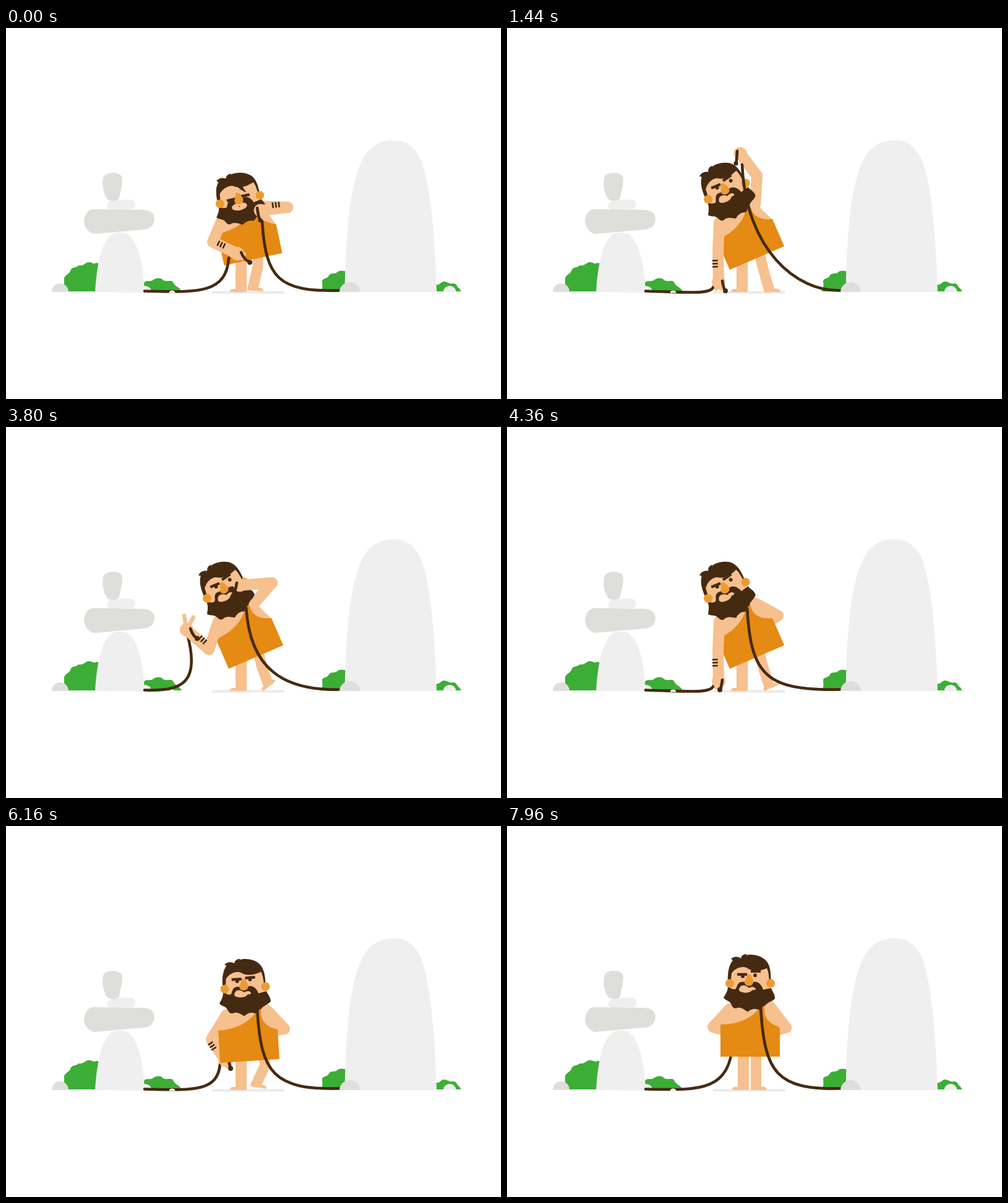
An HTML page that plays this animation: 800 px wide and 600 px high, repeating every 8 s.

```html
<!DOCTYPE html>
<html lang="en">
<head>
<meta charset="utf-8">
<title>Rope</title>
<style>
html, body { margin: 0; width: 100%; height: 100%; overflow: hidden; background: #fff; }
svg { display: block; width: 100%; height: 100%; }
</style>
</head>
<body>
<svg viewBox="0 0 800 600">
  <g fill="#3cae36">
    <path d="M94 426V404C98 397 101 399 104 393C106 385 113 389 117 384C122 385 125 383 128 381C135 376 139 381 143 381Q147 379 150 381V426Z"/>
    <path d="M223 412C226 407 232 411 237 408C242 404 250 403 254 408C261 411 267 407 270 411C273 419 280 418 284 426H223Z"/>
    <path d="M508 426C513 421 511 416 511 408C515 404 518 405 521 402C523 395 530 398 534 396C540 390 545 394 550 393V426Z"/>
    <path d="M695 415C700 417 703 410 708 410C713 410 717 415 723 413C730 414 728 418 731 420C735 422 733 425 737 426H695Z"/>
  </g>
  <g fill="#efefef">
    <path d="M144 427C146 390 153 345 172 333C180 330 190 330 197 334C213 345 222 380 224 428Z"/>
    <path d="M170 280C180 277 196 277 203 278C211 280 211 290 204 293L168 294C161 291 162 282 170 280Z"/>
    <path d="M223 417C230 417 235 421 235 426H223Z"/>
    <path d="M547.500 427C549 330 556 240 582 203C594 187 612 181.500 627 181.500C645 181.500 658 190 668 208C688 250 693 350 696 427Z"/>
    <path d="M706.500 427a10.500 10 0 0 1 21 0Z"/>
    <rect x="333" y="425.500" width="117" height="4" rx="2" fill="#ebebeb"/>
  </g>
  <g fill="#dededb">
    <path d="M158 240C165 232 182 233 187 240C190 249 185 262 183 275C180 281 167 281 163 276C157 266 154 252 158 240Z"/>
    <path d="M140 293L222 294C232 295 240 299 240 309C239 320 233 325 222 326L143 333C133 332 126 321 126 313C127 302 132 294 140 293Z"/>
    <path d="M74 427a13.500 14 0 0 1 27 0Z"/>
  </g>
  <g id="man"></g>
  <path d="M263.500 428.500a5 4 0 0 1 10 0Z" fill="#f6f6f6"/>
  <path d="M539 427a16.500 16 0 0 1 33 0Z" fill="#dededb"/>
</svg>
<script>
const SKIN = '#f6c08f', CLOTH = '#e58a13', HAIR = '#452a12', BLUSH = '#ec9b33';
const TAU = Math.PI * 2, LOOP = 8000, GROUND = 427;
const man = document.getElementById('man');

// leg: x of hip, knee and heel, then y of heel.
// ropeL, tailL, tailR: sideways offsets; slack and taut shape the ropes.
const START = {
  hip: [399.5, 374], lean: -12, bow: 1, squint: 0, leg: [407, 407, 390, 424],
  elbowL: [334, 346], handL: [374, 365], ropeL: -14, tailL: 14, slack: 0, peace: 0,
  elbowR: [455, 290], handR: [411, 295], tailR: 5, taut: 0, bite: 0
};
const LOW = { elbowL: [341, 362], handL: [342, 411], ropeL: -8, tailL: 5, slack: 0, peace: 0 };

// Each step moves only the named parts to a new place.
const STEPS = [
  { from: 120, to: 760, hip: [404, 372], lean: -23.4, bow: 0, leg: [408, 413, 416, GROUND] },
  { from: 120, to: 820, ...LOW, elbowR: [404, 239], handR: [377, 203], tailR: -2, taut: 2.2 },
  { from: 1480, to: 1760, elbowR: [430, 252], handR: [378, 256], tailR: -7, taut: 1.2, bite: 1 },
  { from: 2640, to: 2880, elbowL: [328, 360], handL: [279, 366], ropeL: 5, tailL: -14, slack: 40 },
  { from: 3240, to: 3600, handL: [292, 328], ropeL: 1, tailL: 11, slack: 26, peace: 1 },
  { from: 4000, to: 4280, ...LOW, tailL: -4 },
  { from: 4000, to: 4140, handR: [392, 207] },
  { from: 4140, to: 4320, elbowR: [438, 305], handR: [424, 314], taut: 0 },
  { from: 5840, to: 6160, hip: [394, 380], lean: -3.5, squint: 1, leg: [415, 419, 395, 421],
    elbowL: [332, 345], handL: [354, 378], tailL: 3, elbowR: [450, 328], handR: [425, 333] },
  { from: 6160, to: 6720, hip: [393, 373], lean: 0, squint: 0, leg: [402.5, 402.5, 394, GROUND],
    elbowL: [333, 325], handL: [385, 340], ropeL: -20, elbowR: [451, 326] }
];

const mix = (a, b, u) => Array.isArray(a) ? a.map((v, i) => mix(v, b[i], u)) : a + (b - a) * u;
const ease = u => u * u * (3 - 2 * u);

function stateAt(t) {
  const state = { ...START };
  for (const { from, to, ...goal } of STEPS) {
    if (t <= from) continue;
    const u = ease(Math.min(1, (t - from) / (to - from)));
    for (const key in goal) state[key] = mix(state[key], goal[key], u);
  }
  return state;
}

const fill = (d, color) => `<path d="${d}" fill="${color}"/>`;
const line = (d, w, color, cap = 'round') =>
  `<path d="${d}" fill="none" stroke="${color}" stroke-width="${w}" stroke-linecap="${cap}" stroke-linejoin="round"/>`;
const dot = (x, y, r, color) => `<circle cx="${x}" cy="${y}" r="${r}" fill="${color}"/>`;
const group = (transform, inner) => `<g transform="${transform}">${inner}</g>`;
const limb = (...points) => line('M' + points.join(' '), 18, SKIN);
const cord = d => line(d, 4.6, HAIR);

function leftRope([x, y], slack) {
  const c1 = 224 + 0.6 * (x - 224) + 0.65 * slack;
  return cord(`M224 425.500C${c1} ${GROUND} ${x + slack - 4} ${432 - 0.6 * slack} ${x} ${y}`);
}

function rightRope([x, y], taut, sway) {
  const c1 = x + (539 - x) * (0.2 + 0.16 * taut), c2 = y + (424 - y) * (0.82 - 0.065 * taut);
  return cord(`M539.500 424.500C${c1} ${GROUND} ${x + 6} ${c2 + sway} ${x} ${y + sway}`);
}

// Loose rope end hanging out of a fist.
function tail(x, y, dx, dy, knob) {
  return cord(`M${x} ${y}q${dx * 0.35} ${dy * 0.75} ${dx} ${dy}`) + dot(x + dx, y + dy, knob, HAIR);
}

// Three short marks on the forearm, measured back from the hand.
function tattoo([ex, ey], [hx, hy], side, back) {
  const len = Math.hypot(hx - ex, hy - ey), dx = (hx - ex) / len, dy = (hy - ey) / len;
  return [-5, 0, 5].map(k => {
    const x = hx - dx * (back + k), y = hy - dy * (back + k), a = side - 4.5, b = side + 4.5;
    return line(`M${x - dy * a} ${y + dx * a}L${x - dy * b} ${y + dx * b}`, 2.6, HAIR, 'butt');
  }).join('');
}

function fingers([ex, ey], [hx, hy], peace) {
  const aim = Math.atan2(hy - ey, hx - ex) + peace, size = 11 + 12 * peace;
  return [-0.33, 0.33].map(a =>
    line(`M${hx} ${hy}l${size * Math.cos(aim + a)} ${size * Math.sin(aim + a)}`, 6.5, SKIN)).join('');
}

function head({ bow, squint, lean }, chew) {
  const drop = 12 * bow, browY = -19 + 3.5 * squint + 15 * bow, tilt = (1 - bow) * lean * 0.13;
  const beard = 'M-36 5C-36 14 -40 18 -43 24C-38 30 -34 28 -31 34C-28 41 -26 42 -22 41C-16 39 -12 42 -4 47' +
    'C2 42 8 41 14 44C20 42 20 36 24 37C29 30 36 31 40 25C40 18 36 14 34 8L21 11C19 4 14 -2 8 -2' +
    'C3 -2 0 2 -1 5C-4 -2 -12 -3 -17 -1C-22 2 -21 8 -24 10C-30 11 -32 7 -36 5Z';
  const hair = 'M-36 4C-37 -16 -35 -28 -28 -37L-31 -39C-26 -44 -19 -43 -15 -40C-14 -45 -10 -47 -5 -47L-7 -45' +
    'C2 -48 18 -45 26 -36C33 -28 34 -14 33 0L31 -2C30 -12 30 -18 27 -24C15 -19 3 -18 -6 -25C-14 -28 -24 -24 -30 -16L-32 4Z';
  const mouth = bow > 0.5
    ? `<ellipse cx="-3" cy="13" rx="12.500" ry="7" fill="${SKIN}"/>` + dot(-3, 13, 1, HAIR)
    : fill('M-18 12C-18 3 -9 1 -2 8C3 5 8 6 9 10C8 13 4 10 2 13C-1 17 -15 17 -18 12Z', SKIN);
  return group(`scale(1 ${1 - 0.07 * bow})`,
      fill('M-33 -20Q-30 -36 0 -36T31 -20V20H-33Z', SKIN) + fill(hair, HAIR) +
      fill(`M-4 -30Q2 -16 13 ${-24 + 15 * bow}Q7 -20 8 -30Z`, HAIR)) +
    group(`scale(1 ${1 - 0.12 * bow + 0.025 * chew})`, fill(beard, HAIR) + mouth) +
    dot(-33, 0.5, 7, BLUSH) + dot(33, 0.5, 7, BLUSH) +
    dot(-12, -11 + drop / 2, 3 * (1 - bow), HAIR) +
    dot(8 - 0.2 * lean, -12.5 + drop / 2, 2.9 * (1 - bow), HAIR) +
    line(`M-21 ${-14 + drop}H-5`, 4.4, HAIR, 'butt') +
    line(`M1 ${browY - tilt / 2}L17 ${browY + tilt / 2}`, 4.4, HAIR, 'butt') +
    group(`translate(0 ${3 * bow})`,
      fill('M-4 -14C0 -16 3 -10 5 -4C6 2 2 4.500 -2 4.500C-8 4.500 -11 0 -8 -5Z', BLUSH));
}

function legs([hip, knee, heel, y], shift, t) {
  const tapping = t > 1730 && t < 5870;
  const tap = tapping ? -20 - 20 * Math.cos(TAU * (t - 2880) / 460) : 0;
  return fill(`M${371 + shift} 360h18v67h-27q0 -5 5 -5h4Z`, SKIN) +
    line(`M${hip} 364L${knee} 386L${heel + 8.5} ${y - 1 + tap * 0.2}`, 17, SKIN, 'butt') +
    group(`translate(${heel} ${y}) rotate(${(GROUND - y) * 1.5 + tap})`, fill('M0 0H26Q26 -5.500 19 -5.500H0Z', SKIN));
}

function draw(t) {
  const s = stateAt(t), { hip: [cx, cy], handL, handR, elbowL, elbowR } = s;
  const rad = s.lean * Math.PI / 180, cos = Math.cos(rad), sin = Math.sin(rad);
  const place = (x, y) => [cx + x * cos - y * sin, cy + x * sin + y * cos];
  const pose = `translate(${cx} ${cy}) rotate(${s.lean})`;
  const chew = t > 4300 ? Math.sin(TAU * t / 480) : 0;
  const leftBack = t >= 6080, rightBack = t >= 4220;

  const left = leftRope([handL[0] + s.ropeL, handL[1] + 7], s.slack) +
    limb(...place(-33, -77), ...elbowL, ...handL) + dot(...handL, 11, SKIN) +
    fingers(elbowL, handL, s.peace) + tattoo(elbowL, handL, 5 - 7 * s.bow, 30) +
    tail(handL[0] + 6, handL[1] - 2, s.tailL, 16, 4);
  const forearm = limb(...elbowR, ...handR) + dot(...handR, 10.5, SKIN) +
    (t < 420 ? tattoo(elbowR, handR, 6, 26) : '');
  const ropeEnd = mix([handR[0] + 3, handR[1] + 18], place(17, -79), s.bite);

  man.innerHTML = legs(s.leg, t > 6160 ? 2 * s.lean / 3.5 + 2 : 0, t) +
    (rightBack ? forearm : '') + (leftBack ? left : '') +
    group(pose,
      fill('M-48 -50L-30 -90H30L48 -46L0 -30Z', SKIN) +
      fill('M-48 0V-52C-30 -52 -5 -56 13 -76V-95H23V-72C24 -60 34 -52 48 -48V0Z', CLOTH)) +
    (leftBack ? '' : left) +
    limb(...place(32, -81), ...elbowR) +
    group(`${pose} translate(${s.lean * 0.08} ${-119 + 19.5 * s.bow})`, head(s, chew)) +
    (rightBack ? '' : forearm) +
    rightRope(ropeEnd, s.taut, 2 * chew) +
    (rightBack ? '' : tail(handR[0] - 5, handR[1] - 4, s.tailR, 20, 3.6 - 1.3 * s.bite));
}

const start = performance.now();
function tick(now) {
  draw(Math.max(0, now - start) % LOOP);
  requestAnimationFrame(tick);
}
draw(0);
requestAnimationFrame(tick);
</script>
</body>
</html>
```
